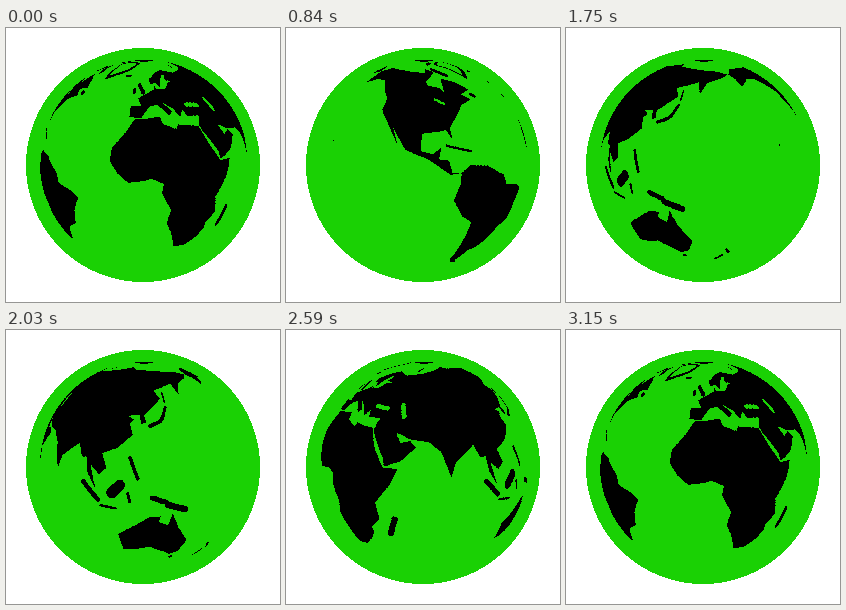
Animation, 274 px wide and 274 px high, one loop 3220 ms. Source, as an HTML page with a canvas:

```html
<!DOCTYPE html>
<html>
<head>
<meta charset="utf-8">
<title>Globe</title>
<style>
html, body { margin: 0; width: 100%; height: 100%; overflow: hidden; background: #fff; }
canvas { display: block; width: 274px; height: 274px; image-rendering: pixelated; }
</style>
</head>
<body>
<canvas id="stage" width="274" height="274"></canvas>
<script>
// Rough outlines: longitude, latitude pairs in degrees.
const africa = [-6,35.8,10,37.3,11,33.5,19,30.3,20,32.7,33,31,37,21.5,43,12,51,12,47,4,39,-6,
  40.5,-15,35,-20,35.4,-24,32,-29,26,-34,18.5,-34.4,14.5,-23,11.8,-17,13.6,-10,9,-1,9.5,4,
  4,6.4,-7.7,4.4,-13.3,9,-17.4,14.7,-17,21,-10,29.5];
const europe = [-9,37,-9,43.2,-1.5,43.5,-4.6,48.3,8.5,54,9,57.5,10.5,54.3,19,54.6,24,59.2,30,59.9,
  22,60.8,25,65,22,65.7,17.3,61.5,14.5,55.5,11,59,6,58.3,5,62,14,68,25.5,71,41,67,60,69,60,38,
  36,36.5,27.5,36.8,26,40.7,22.8,36.6,19.4,41.5,13,45.5,18.4,40,15.8,38,9,44.4,3.5,43,-2,36.7];
const asia = [36,37,34,31,35,28.5,42.7,16.5,43.5,12.7,52,15.6,59.8,22.5,56.4,26,51.5,24.5,48,30,
  57,26.5,66.6,25.3,72.8,20.5,77.5,8,80.2,15,91,22.7,94.3,16.2,97.5,16.5,98.6,9,103.5,1.4,
  100,13.3,105,8.7,109,12,106,19,114,22.3,121.8,29,119.5,35,122,37,118,39,125,39.6,126.5,34.6,
  129.3,35.5,128,39.5,140,49,136,54.7,55,60,50,40];
const siberia = [136,54.7,155,59.5,156.7,51,163,59,179,62.5,190,65.5,180,69,140,72.7,113,74,
  104,77.7,80,72.5,60,69,55,52,130,50];
const northAmerica = [-168,65.7,-156.5,71.2,-128,70,-95,68,-94,72,-82,69,-94.5,60,-92,57,-82.3,55,
  -79.5,51.5,-78,62.4,-65,59,-55.8,52.5,-66,50,-60,46,-70,43,-75,38,-81.3,31,-80.3,25.2,-83.5,30,
  -97.3,28.5,-97.5,20,-91.5,18.5,-87,21.4,-88.5,16,-83.3,15,-82,9,-77.3,8.6,-83,8.3,-94,16,
  -105.5,20.3,-114,31.5,-110,23,-117.2,32.6,-124.2,40.3,-124,47,-138,59,-150,60,-164,55,-165,61.5];
const southAmerica = [-77.3,8.6,-72,12,-62,10.6,-51.5,4.3,-49,-1,-40,-2.8,-35,-6,-39,-13,-41,-22,
  -48.5,-26,-53.5,-34,-58,-38.3,-65,-41,-69,-51.5,-65.2,-54.7,-70,-55.5,-75.5,-48,-73.5,-37,
  -70.3,-18.4,-76.2,-14,-81.2,-5,-77.5,4];
const australia = [113.7,-23,115.5,-34.5,124,-33.5,131,-31.5,138,-35,145,-39,150,-37.4,153.4,-29,
  146.3,-19,142.5,-10.7,140.5,-17.5,135.5,-15,136.5,-12,131,-12,122.3,-17.7];
const greenland = [-70,78,-55,72,-45,60,-22,70,-12,81.5,-35,83.5,-62,81];

// Round strokes: from longitude, latitude to longitude, latitude, width.
const islands = [
  [-4,57.5,-.5,52,3], [-8,54,-8,52.5,2.5], [-21,65,-16,65,2], [49,-14,45.5,-23.5,3.2],
  [96.5,4,104.5,-4,2.8], [106,-7,114,-8,1.3], [112,0,116,4,5.5], [120,0,121,-4,1.5],
  [132,-2,139,-4.5,2.6], [140,-6,149,-9,3.4], [121,17.5,125,7.5,1.8], [131.5,33.5,138,36,2],
  [139,37,142.5,43.5,2], [142.8,53,142.8,47,1.2], [174.5,-36.5,176.5,-39.5,1.8],
  [168.5,-45.5,172.5,-42,2], [146.5,-42,146.6,-42.3,2.6], [-84,22.3,-71,18.8,1.2],
  [-57.5,49,-55,48,2.6], [-84,72,-68,65,4], [-88,79,-75,81.5,4], [55,72,64,76,1.5],
  [-155.6,19.6,-155.4,19.5,.8], [-60,-64,-66,-68,2], [55,-67.5,150,-67.5,2.4]
];
const lakes = [[30,43.3,39,42.5,2.5], [49.5,45,51.5,38.5,3], [-88,47.5,-82,44.5,1.5]];

const SIZE = 274, DISC = 117, CX = 138, CY = 135.5, R = 104;
const DIST = 7.5, TILT = 14 * Math.PI / 180;
const STEP_MS = 70, STEPS = 46, TURN = 8;
const SCALE = 4, MW = 360 * SCALE, MH = 180 * SCALE;
const LAND = '#fff', WATER = '#000';

// Same outline drawn in towards its middle.
function shrink(pts, k) {
  const mean = odd => pts.reduce((s, v, i) => i % 2 === odd ? s + v : s, 0) * 2 / pts.length;
  const mid = [mean(0), mean(1)];
  return pts.map((v, i) => mid[i % 2] + (v - mid[i % 2]) * k);
}

function buildMask() {
  const c = document.createElement('canvas');
  c.width = MW;
  c.height = MH;
  const g = c.getContext('2d', { willReadFrequently: true });
  g.lineCap = 'round';
  const trace = (pts, wrap) => {
    g.beginPath();
    for (let i = 0; i + 1 < pts.length; i += 2)
      g.lineTo((pts[i] + wrap) * SCALE, (90 - pts[i + 1]) * SCALE);
  };
  const fill = (color, ...shapes) => {
    g.fillStyle = color;
    for (const pts of shapes) for (const wrap of [-180, 180]) {
      trace(pts, wrap);
      g.fill();
    }
  };
  const stroke = (color, lines) => {
    g.strokeStyle = color;
    for (const line of lines) {
      g.lineWidth = line[4] * SCALE;
      trace(line, 180);
      g.stroke();
    }
  };
  g.fillRect(0, 0, MW, MH);
  fill(LAND, africa, europe, asia, siberia, northAmerica, southAmerica, australia, greenland);
  stroke(LAND, islands);
  stroke(WATER, lakes);
  fill(WATER, shrink(greenland, .75));
  g.fillStyle = LAND;
  g.fillRect(0, 0, MW, 5 * SCALE);
  const d = g.getImageData(0, 0, MW, MH).data;
  return Uint8Array.from({ length: MW * MH }, (_, i) => d[i * 4] > 127 ? 1 : 0);
}

// Perspective view: pixel -> mask row and longitude from the central meridian.
function project(px, py) {
  const f = Math.sqrt(DIST * DIST - 1);
  const a = (px + .5 - CX) / R / f, b = (CY - py - .5) / R / f;
  const k = 1 + a * a + b * b, root = DIST * DIST - k * f * f;
  if (root < 0) return null;
  const t = (DIST - Math.sqrt(root)) / k;
  const x = a * t, y = b * t, z = DIST - t;
  const lat = Math.asin(y * Math.cos(TILT) + z * Math.sin(TILT)) * 180 / Math.PI;
  const lon = Math.atan2(x, z * Math.cos(TILT) - y * Math.sin(TILT)) * 180 / Math.PI;
  return { row: Math.min(MH - 1, Math.floor((90 - lat) * SCALE)) * MW, lon: lon + 180 };
}

const ctx = document.getElementById('stage').getContext('2d');
const image = ctx.createImageData(SIZE, SIZE);
const out = new Uint32Array(image.data.buffer);
const GREEN = 0xff04d11a, BLACK = 0xff000000, WHITE = 0xffffffff;
const mask = buildMask();
const globe = [];
for (let y = 0; y < SIZE; y++) for (let x = 0; x < SIZE; x++) {
  const i = y * SIZE + x;
  out[i] = Math.hypot(x + .5 - SIZE / 2, y + .5 - SIZE / 2) < DISC ? GREEN : WHITE;
  const p = project(x, y);
  if (p) globe.push({ i, ...p });
}

let shown = -1;
function draw() {
  const step = Math.floor(performance.now() / STEP_MS) % STEPS;
  if (step !== shown) {
    shown = step;
    for (const { i, row, lon } of globe) {
      const col = Math.floor((lon - step * TURN + 720) % 360 * SCALE);
      out[i] = mask[row + col] ? BLACK : GREEN;
    }
    ctx.putImageData(image, 0, 0);
  }
  requestAnimationFrame(draw);
}
draw();
</script>
</body>
</html>
```
